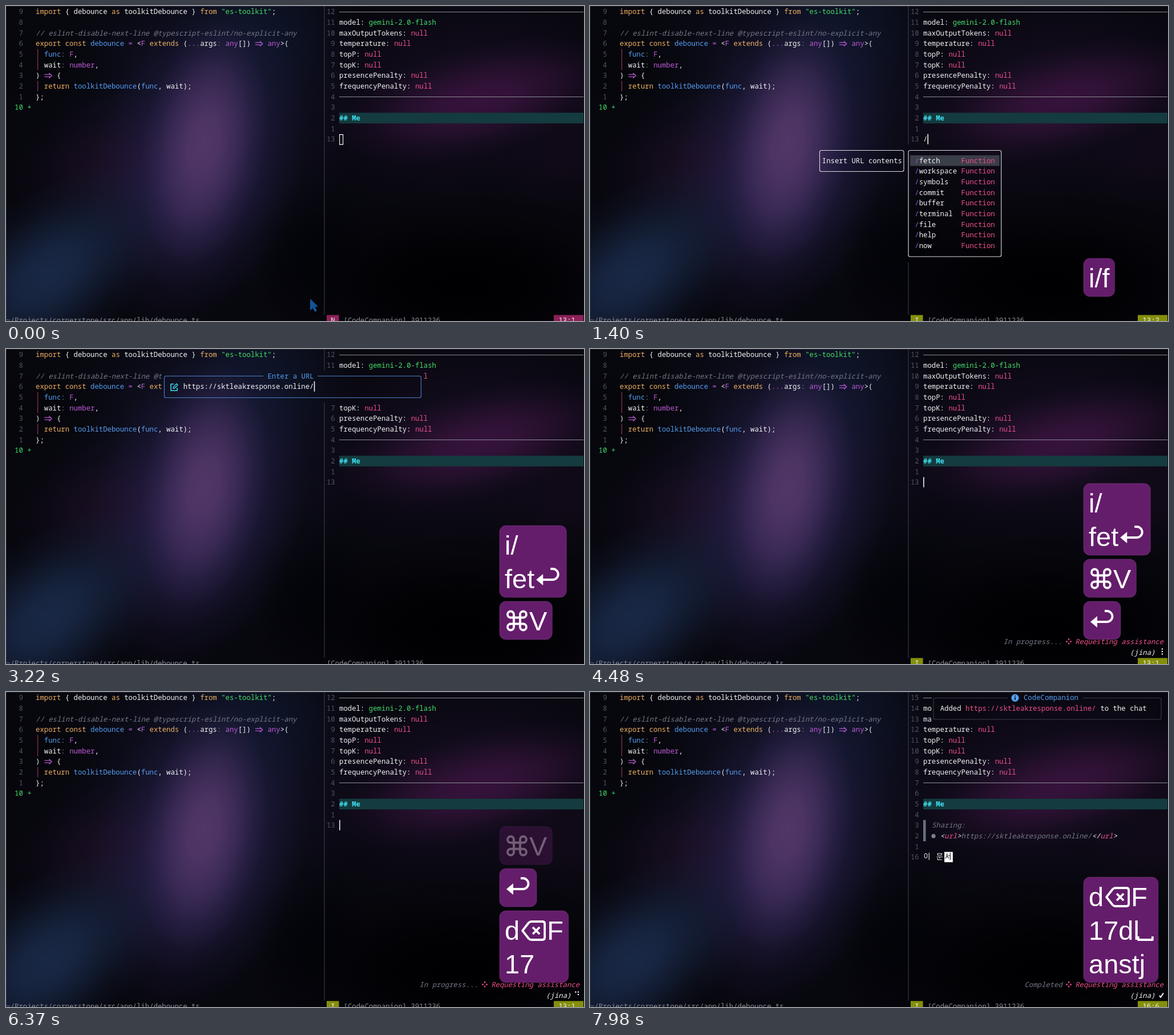
Recreate the animation shown at these times as an HTML page with a canvas. Size 1013 by 553 pixels, loop 8 s.

```html
<!DOCTYPE html>
<html lang="en">
<head>
<meta charset="utf-8">
<title>Editor chat</title>
<style>
  html, body { margin: 0; width: 100%; height: 100%; overflow: hidden; background: #000; }
  canvas { display: block; }
</style>
</head>
<body>
<canvas id="stage" width="1013" height="553"></canvas>
<script>
const W = 1013, H = 553, LOOP = 8000, TICK = 70;
const CW = 7.39, RH = 18.67;
const MONO = '12.317px "Noto Sans Mono", "DejaVu Sans Mono", monospace';
const HANGUL = '13px "Noto Sans CJK KR", "Noto Sans CJK JP", sans-serif';
const KEYS = '47px "Liberation Sans", Arial, sans-serif';
const COLORS = {
  w: '#f2f2f5', o: '#eeb062', g: '#45dd68', s: '#747887', p: '#bd5bd6', b: '#559df0',
  k: '#ee4f8d', c: '#3fdff0', n: '#53545f', v: '#9a5bd8', d: '#8b8b96'
};
const URL_TEXT = 'https://sktleakresponse.online/';
const ctx = document.getElementById('stage').getContext('2d');
let g = ctx;

const colX = c => 0.3 + c * CW;
const rowTop = r => 0.7 + r * RH;
const rowMid = r => 10.2 + r * RH;

function rect(x, y, w, h, color) { g.fillStyle = color; g.fillRect(x, y, w, h); }

function frame(x, y, w, h, color, r = 3) {
  g.strokeStyle = color;
  g.lineWidth = 1.1;
  g.beginPath();
  g.roundRect(x, y, w, h, r);
  g.stroke();
}

function line(points, color, width) {
  g.strokeStyle = color;
  g.lineWidth = width;
  g.beginPath();
  points.forEach(([x, y]) => g.lineTo(x, y));
  g.stroke();
}

// Text on the character grid; "^x" switches to colour x.
function put(col, row, text, style = '') {
  g.font = style + ' ' + MONO;
  const parts = ('^w' + text).split(/\^(\w)/);
  for (let i = 1; i < parts.length; i += 2) {
    g.fillStyle = COLORS[parts[i]];
    g.fillText(parts[i + 1], colX(col), row * RH + 14.4);
    col += parts[i + 1].length;
  }
}

function arrow(col, row) {
  const x = colX(col) + 0.5, y = rowMid(row);
  line([[x, y - 2], [x + 11, y - 2]], COLORS.p, 1.2);
  line([[x, y + 2], [x + 11, y + 2]], COLORS.p, 1.2);
  line([[x + 8, y - 4.5], [x + 13, y], [x + 8, y + 4.5]], COLORS.p, 1.2);
}

const bar = (x, row) => rect(x, rowTop(row), 1.5, 18, '#fff');

// Wallpaper: soft tilted ellipses over near black.
const wall = document.createElement('canvas');
wall.width = W;
wall.height = H;
function paintWall() {
  g = wall.getContext('2d');
  rect(0, 0, W, H, '#07070e');
  const blob = (x, y, rx, ry, deg, rgb, a) => {
    const f = g.createRadialGradient(0, 0, 0, 0, 0, 1);
    f.addColorStop(0, `rgba(${rgb},${a})`);
    f.addColorStop(0.25, `rgba(${rgb},${a * 0.88})`);
    f.addColorStop(0.5, `rgba(${rgb},${a * 0.55})`);
    f.addColorStop(0.75, `rgba(${rgb},${a * 0.2})`);
    f.addColorStop(1, `rgba(${rgb},0)`);
    g.save();
    g.translate(x, y);
    g.rotate(deg * Math.PI / 180);
    g.scale(rx, ry);
    g.fillStyle = f;
    g.fillRect(-1, -1, 2, 2);
    g.restore();
  };
  blob(350, 190, 280, 330, 10, '24,24,52', 0.75);
  blob(445, 50, 170, 190, 0, '15,25,48', 0.6);
  blob(190, 275, 190, 120, -15, '36,18,44', 0.55);
  blob(335, 285, 185, 290, 17, '42,34,80', 0.88);
  blob(347, 242, 108, 220, 10, '88,58,108', 0.85);
  blob(75, 470, 250, 140, -38, '28,46,80', 0.85);
  blob(800, 160, 340, 210, -8, '24,15,36', 0.75);
  blob(830, 165, 260, 95, -14, '62,20,66', 0.8);
  blob(1000, 260, 160, 110, -20, '24,12,30', 0.5);
  blob(800, 490, 380, 170, 0, '0,0,2', 1);
  blob(540, 440, 110, 150, 10, '2,3,8', 0.8);
  blob(40, 110, 190, 90, 0, '5,6,10', 0.7);
  rect(0, 0, W, 1, 'rgba(255,255,255,.1)');
  rect(0, 0, 1, H, 'rgba(255,255,255,.1)');
  g = ctx;
}
const clear = (x, y, w, h) => g.drawImage(wall, x, y, w, h, x, y, w, h);

const CODE = [
  '^oimport ^w{ debounce ^oas ^wtoolkitDebounce } ^ofrom ^g"es-toolkit"^w;',
  '', '',
  '^oexport const ^bdebounce ^p= ^w<^pF ^oextends ^w(^p...^wargs^s: ^pany^w[]) ^p   any^w>(',
  '  ^bfunc^s: ^pF^w,',
  '  wait^s: ^pnumber^w,',
  ')    {',
  '  ^oreturn ^btoolkitDebounce^w(^bfunc^w, wait);',
  '};'
];
const SETTINGS = ['model: ^ggemini-2.0-flash',
  ...['maxOutputTokens', 'temperature', 'topP', 'topK', 'presencePenalty', 'frequencyPenalty']
    .map(s => s + ': ^knull')];

function leftPane() {
  CODE.forEach((s, r) => {
    put(3, r, '^n' + (9 - r));
    put(7, r, s);
  });
  put(7, 2, '^s// eslint-disable-next-line @typescript-eslint/no-explicit-any', 'italic');
  arrow(59, 3);
  arrow(9, 6);
  rect(55, 75.5, 1.2, 37, '#963253');
  rect(55, 131.5, 1.2, 18, '#963253');
  put(2, 9, '^g10 +');
  put(0, 29, '^d~/Projects/cornerstone/src/app/lib/debounce.ts');
}

function rightPane(cur) {
  rect(557.5, 0, 1, 542, '#40404c');
  for (let r = 0; r <= cur; r++)
    put(76, r, '^n' + String(r == cur ? cur + 1 : cur - r).padStart(2));
  rect(584, 10, 428, 1, '#8c8c96');
  rect(584, 159, 428, 1, '#8c8c96');
  SETTINGS.forEach((s, i) => put(79, i + 1, s));
  rect(584, rowTop(10), 428, 18.7, '#143b3f');
  put(79, 10, '^c## Me', 'bold');
}

// Without a mode the badges vanish and the label moves to the edge.
function status(mode, pos) {
  put(mode ? 80 : 76, 29, '^d[CodeCompanion] 3911236');
  if (!mode) return;
  const color = mode == 'N' ? '#8d2159' : '#858f0c';
  rect(562, 542.5, 21.5, 11, color);
  rect(960, 542.5, 52, 11, color);
  put(77, 29, mode);
  put(131, 29, pos);
}

function menu(names) {
  const kindCol = 78 + Math.max(...names.map(n => n.length)) + 1;
  const right = colX(kindCol + 8) + 11, h = names.length * RH + 18.5;
  clear(553, 243, right - 548, h + 20);
  clear(400, 243, 153, 56);
  frame(402.5, 253.5, 147.5, 37, '#dcdce2');
  put(55, 14, 'Insert URL contents');
  frame(558, 253.5, right - 558, h, '#dcdce2');
  rect(561, rowTop(14), right - 564, 18.7, '#3a3e47');
  names.forEach((n, i) => {
    put(77, 14 + i, '^v/^w' + n);
    put(kindCol, 14 + i, '^kFunction');
  });
}

function dialog(text) {
  clear(273, 37, 459, 57);
  frame(277.5, 47.5, 450, 38, '#4a80c8');
  clear(451, 44, 95, 8);
  put(62, 2, '^bEnter a URL');
  g.lineJoin = 'round';
  line([[294, 61.5], [289, 61.5], [289, 73], [300, 73], [300, 68]], COLORS.c, 1.6);
  line([[293, 69.5], [293.5, 66.5], [299, 61], [301, 63], [295.5, 68.8], [293, 69.5]], COLORS.c, 1.4);
  put(42, 3, text);
  bar(colX(42 + text.length), 3);
}

function toast() {
  clear(599, 0, 413, 56);
  frame(602, 10.5, 399, 37.5, '#383b4c');
  clear(732, 5, 132, 10);
  g.fillStyle = COLORS.b;
  g.beginPath();
  g.arc(745, 10.3, 6.6, 0, 7);
  g.fill();
  rect(744.2, 9, 1.8, 5, '#10131f');
  rect(744.2, 6.2, 1.8, 1.8, '#10131f');
  put(102.8, 0, '^bCodeCompanion');
  put(83, 1, `Added ^k${URL_TEXT}^w to the chat`);
}

// Braille dots 1-6 lit in each spinner step.
const SPIN = ['124', '145', '1456', '456', '3456', '356', '236', '1236', '123', '1234'];
function progress(t, done) {
  const label = done ? 'Completed' : 'In progress...';
  put(112 - label.length, 27, '^s' + label, 'italic');
  put(115, 27, '^kRequesting assistance', 'italic');
  for (const [x, y] of [[839, 509.5], [835.5, 513.5], [842.5, 513.5], [839, 517]])
    rect(x - 1.2, y - 1.2, 2.5, 2.5, COLORS.k);
  put(128, 28, '(jina)', 'italic');
  if (done) {
    line([[998, 533], [1000, 536], [1005, 528.5]], '#fff', 2);
    return;
  }
  const step = Math.min(9, Math.floor(((t - 4340 + 2100) % 1050 + 25) / 100));
  for (const d of SPIN[(step + 2) % 10])
    rect(d > 3 ? 1001.8 : 997.2, 525.6 + (d - 1) % 3 * 4.4, 2.2, 2.2, '#fff');
}

function hangul(text, col, row, composing) {
  if (composing) rect(colX(col), rowTop(row), 14.8, 18, '#fff');
  g.font = HANGUL;
  g.fillStyle = composing ? '#000' : COLORS.w;
  g.fillText(text, colX(col) + 0.5, row * RH + 13.4);
}

function shared() {
  rect(584, rowTop(12), 4.5, 37.3, '#6b6f7e');
  put(81, 12, '^sSharing:', 'italic');
  g.fillStyle = '#7d8190';
  g.beginPath();
  g.arc(602, rowMid(13), 3.6, 0, 7);
  g.fill();
  put(83, 13, `<^kurl^w>^s${URL_TEXT}^w</^kurl^w>`, 'italic');
}

// Key blocks: [time, added keys]; "|" starts a new row.
const BLOCKS = [
  { fade: 4900, keys: [[910, 'i'], [1120, '/'], [1400, 'f'], [1540, 'e'], [1680, 't'], [1890, '⏎']], wrap: 2 },
  { fade: 6160, keys: [[3080, '⌘'], [3150, 'V']] },
  { fade: 7000, keys: [[3850, '⏎']] },
  { fade: 9999, keys: [[5950, 'd'], [6160, '⌫'], [6300, 'F|17'], [6440, 'd'], [6580, 'l'], [6790, '␣'],
    [7140, '|a'], [7280, 'n'], [7420, 's'], [7630, 't'], [7840, 'j']] }
];
const ICONS = {
  '⌘': { w: 43, d: 'M16 11V-11a5.5 5.5 0 1 0-5.5 5.5H32.5a5.5 5.5 0 1 0-5.5-5.5V11a5.5 5.5 0 1 0 5.5-5.5H10.5a5.5 5.5 0 1 0 5.5 5.5z' },
  '⏎': { w: 47, d: 'M12 2H32a9.5 9.5 0 0 0 0-19H28', fill: 'M3 2L15-8V12z' },
  '⌫': { w: 48, d: 'M5 1L16-13Q18-15 21-15H40Q44-15 44-11V13Q44 17 40 17H21Q18 17 16 15zM23-5L35 7M35-5L23 7' },
  '␣': { w: 24, d: 'M-2 11V17H23V11' }
};
const keyWidth = ch => ICONS[ch] ? ICONS[ch].w : g.measureText(ch).width;
const rowWidth = s => [...s].reduce((sum, ch) => sum + keyWidth(ch), 0);

function keycast(t) {
  let bottom = 510;
  g.font = KEYS;
  for (const b of [...BLOCKS].reverse()) {
    const alpha = Math.min(1, 1 - (t - b.fade + TICK) / 420);
    let text = b.keys.filter(k => k[0] <= t).map(k => k[1]).join('');
    if (!text || alpha <= 0) continue;
    if (b.wrap && text.endsWith('⏎')) text = text.slice(0, b.wrap) + '|' + text.slice(b.wrap);
    const rows = text.split('|'), h = 8 + 59 * rows.length, top = bottom - h;
    g.globalAlpha = alpha;
    g.fillStyle = '#641d6b';
    g.beginPath();
    g.roundRect(865, top, 18 + Math.max(...rows.map(rowWidth)), h, 11);
    g.fill();
    g.strokeStyle = 'rgba(150,90,155,.35)';
    g.lineWidth = 1;
    g.stroke();
    rows.forEach((s, i) => {
      let x = 874;
      for (const ch of s) {
        const icon = ICONS[ch], y = top + 51 + 59 * i;
        g.fillStyle = g.strokeStyle = '#fff';
        if (icon) {
          g.save();
          g.translate(x, y - 17);
          g.lineWidth = 3.8;
          g.stroke(new Path2D(icon.d));
          if (icon.fill) g.fill(new Path2D(icon.fill));
          g.restore();
        } else g.fillText(ch, x, y);
        x += keyWidth(ch);
      }
    });
    g.globalAlpha = 1;
    bottom = top - 7;
  }
}

function pointer(t) {
  const alpha = Math.min(1, 1 - t / 490);
  if (alpha <= 0) return;
  g.globalAlpha = alpha;
  g.fillStyle = '#145391';
  g.fill(new Path2D('M533 514V534.5L537.5 530.5L541.5 537L545 535L541.5 528.5L547 527.5z'));
  g.globalAlpha = 1;
}

// Latest value of a [time, value] list.
const at = (list, t) => list.reduce((v, [time, next]) => t >= time ? next : v, '');
const TYPED = [[1120, '/'], [1470, '/f'], [1610, '/fe'], [1680, '/fet'], [1890, ''], [5950, 'd'], [6160, '']];
const KOREAN = [[6440, 'ㅇ'], [6580, '이'], [7140, '이ㅁ'], [7280, '이무'], [7420, '이문'], [7630, '이문ㅅ'], [7840, '이문서']];
const ALL = 'fetch workspace symbols commit buffer terminal file help now'.split(' ');
const MENUS = [[1190, ALL], [1470, ['fetch', 'file', 'buffer']], [1610, ['fetch', 'buffer']], [1680, ['fetch']], [1890, '']];

function draw(t) {
  const done = t >= 7140, cur = done ? 15 : 12;
  const asking = t >= 1960 && t < 3920;
  const typed = at(TYPED, t), korean = at(KOREAN, t), names = at(MENUS, t);
  g.drawImage(wall, 0, 0);
  leftPane();
  rightPane(cur);
  if (done) shared();

  put(79, cur, typed);
  if (korean) {
    const spaced = t >= 6790 && t < 7140;
    [...korean].forEach((ch, i) => {
      const last = i == korean.length - 1;
      hangul(ch, 79 + i * 2 + (i > 0), cur, last && !spaced);
    });
    if (spaced) bar(colX(82), cur);
  } else if (t < 910) {
    if (t < 280) frame(584.6, 225.6, 6, 17.5, '#fff', 0);
    else rect(584, 225, 7.4, 18.5, '#fff');
  } else if (!asking) bar(colX(79 + typed.length), cur);

  const column = done ? (t < 7630 ? 5 : 6) : t >= 6790 ? 4 : 1 + typed.length;
  status(asking ? '' : t < 910 ? 'N' : 'I', `${cur + 1}:${column}`);
  if (asking) dialog(t < 3220 ? '' : URL_TEXT);
  if (names) menu(names);
  if (done) toast();
  keycast(t);
  if (t >= 3990) progress(t, done);
  pointer(t);
}

paintWall();
const start = performance.now();
(function tick() {
  const t = (performance.now() - start) % LOOP;
  draw(Math.floor(t / TICK) * TICK);
  requestAnimationFrame(tick);
})();
</script>
</body>
</html>
```
